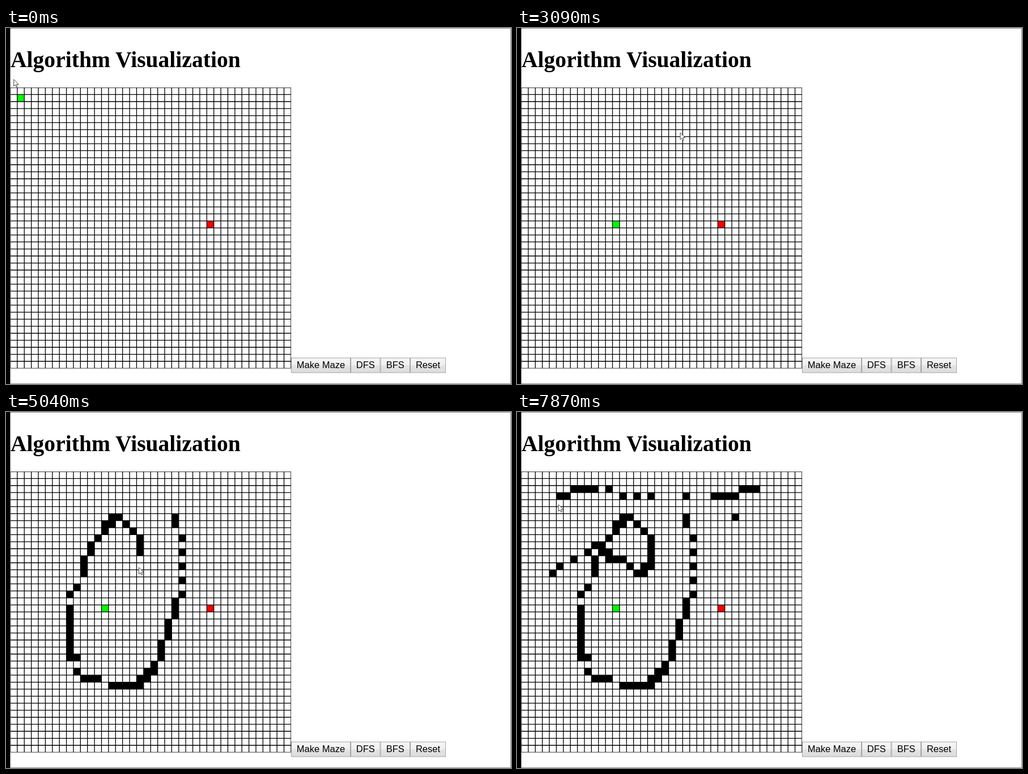
An HTML page that plays this animation: 891 px wide and 628 px high, repeating every 8000 ms.

```html
<!DOCTYPE html>
<html lang="en">
<head>
<meta charset="utf-8">
<title>Algorithm Visualization</title>
<style>
html, body { margin: 0; width: 100%; height: 100%; overflow: hidden; background: #fff; }
svg { display: block; width: 891px; height: 628px; }
.title { font: bold 39.6px "Liberation Serif", serif; }
.label { font: 16.5px "Liberation Sans", sans-serif; text-anchor: middle; }
</style>
</head>
<body>
<svg viewBox="0 0 891 628">
  <defs>
    <linearGradient id="face" x1="0" y1="0" x2="0" y2="1">
      <stop offset="0" stop-color="#f6f6f6"/>
      <stop offset=".49" stop-color="#efefef"/>
      <stop offset=".51" stop-color="#e4e4e4"/>
      <stop offset="1" stop-color="#dcdcdc"/>
    </linearGradient>
    <clipPath id="board"><rect x="7.5" y="105" width="495.5" height="495.5"/></clipPath>
  </defs>
  <rect width="891" height="628" fill="#fff"/>
  <path d="M0 .5H890.5V627.5H0" fill="none" stroke="#8c8c8c"/>
  <rect width="7.5" height="628"/>
  <text class="title" x="8" y="69">Algorithm Visualization</text>
  <g clip-path="url(#board)">
    <path id="walls"/>
    <path id="goal" fill="#f00"/>
    <path id="start" fill="#0f0"/>
    <path id="grid" fill="none" stroke="#000" stroke-width="1.3"/>
  </g>
  <g id="buttons"></g>
  <path id="cursor" d="M0 0V12L2.8 9.5 4.6 13.5 6.5 12.7 4.7 8.8H8.5Z" fill="#fff" stroke="#333" stroke-width=".9"/>
</svg>
<script>
const SIZE = 40, PITCH = 12.385, LEFT = 7.5, TOP = 105;
const LOOP = 8000;
const STEP = 150;  // the picture is refreshed this often
const TICK = 30;   // the board reads the mouse this often
const LEAD = 60;   // the pointer runs ahead of the board
const SYNC = [0, 280, 560, 2040, 3820, 5040, 6820];

const $ = id => document.getElementById(id);
const px = c => LEFT + c * PITCH;
const py = r => TOP + r * PITCH;
const cell = ({ c, r }) =>
  `M${px(Math.round(c))} ${py(Math.round(r))}h${PITCH}v${PITCH}h${-PITCH}z`;

// Mouse gestures: start time, tool, then [ticks, column, row] corners.
// Fast movement leaves gaps between the walls.
const gestures = [
  { at: 90, path: [[0, 0, -1.65], [8, .55, .5], [9, .55, .5], [3, 1.1, .8]] },
  { at: 940, tool: "drag", path: [[0, 1.1, .8], [26, 10, 18.6], [4, 10.8, 18.6],
    [9, 12, 18.9], [3, 12, 18.9], [5, 13.2, 19]] },
  { at: 2560, path: [[0, 13.4, 17.5], [8, 13.4, 17.5], [12, 22.4, 5.6]] },
  { at: 3320, tool: "draw", path: [
    [0, 22.8, 5.8], [2, 24, 9], [4, 23.7, 17], [10, 20.3, 27], [5, 17.9, 29.7],
    [4, 13.5, 29.6], [3, 9.7, 28.6], [2, 8.7, 26.45], [1, 8.2, 26], [7, 7.6, 19],
    [3, 9.6, 14], [3, 10.7, 11], [3, 12.7, 8], [4, 14.8, 5.9], [4, 17.7, 8.9],
    [4, 18, 13], [3, 16.4, 14.4], [1, 15, 12.7], [3, 12.3, 11.7], [4, 10.3, 9.7],
    [4, 3.7, 14]] },
  { at: 6000, path: [[0, 23, 7.8], [10, 30.5, 6]] },
  { at: 6765, tool: "draw", path: [
    [0, 30, 6], [1, 28, 3], [1, 23, 2.7], [8, 23, 2.7], [1, 27, 3], [6, 30, 3],
    [1, 31, 2], [4, 33, 2.4], [3, 18, 3.2], [4, 10, 2], [3, 7, 2.3], [2, 5, 3]] },
  { at: 7860, path: [[0, 4.8, 4.2]] }
];

const corners = gestures.flatMap(g => {
  let t = g.at;
  const list = g.path.map(([n, c, r]) => ({ t: t += n * TICK, c, r }));
  g.end = t;
  return list;
});

function mouse(t) {
  const i = corners.findIndex(p => p.t >= t);
  if (i < 0) return corners[corners.length - 1];
  if (i == 0) return corners[0];
  const a = corners[i - 1], b = corners[i];
  const k = (t - a.t) / (b.t - a.t);
  return { c: a.c + (b.c - a.c) * k, r: a.r + (b.r - a.r) * k };
}

const marks = [];
for (const g of gestures.filter(g => g.tool == "draw"))
  for (let t = g.at; t <= g.end; t += TICK) marks.push({ t, d: cell(mouse(t)) });

const drag = gestures.find(g => g.tool == "drag");

let lines = "";
for (let i = 0; i <= SIZE; i++)
  lines += `M${px(i)} ${TOP}V${py(SIZE)}M${LEFT} ${py(i)}H${px(SIZE)}`;
$("grid").setAttribute("d", lines);
$("goal").setAttribute("d", cell({ c: 28, r: 19 }));

const edges = [503, 608, 660.5, 713, 776];
$("buttons").innerHTML = ["Make Maze", "DFS", "BFS", "Reset"].map((name, i) => {
  const x = edges[i], w = edges[i + 1] - x;
  return `<rect x="${x + .5}" y="582" width="${w - 1}" height="26" fill="url(#face)" stroke="#a4a4a4"/>
    <text class="label" x="${x + w / 2}" y="600">${name}</text>`;
}).join("");

function held(t) {
  const from = SYNC.filter(s => s <= t).pop();
  return from + Math.floor((t - from) / STEP) * STEP;
}

let shown = -1;
function draw(now) {
  const t = held(now % LOOP);
  if (t === shown) return;
  shown = t;
  const tip = mouse(t + LEAD);
  const grip = mouse(Math.min(Math.max(t, drag.at), drag.end));
  $("walls").setAttribute("d", marks.filter(m => m.t <= t).map(m => m.d).join(""));
  $("start").setAttribute("d", cell(grip));
  $("cursor").setAttribute("transform", `translate(${px(tip.c + .5)} ${py(tip.r + .5)})`);
}
function tick() {
  draw(performance.now());
  requestAnimationFrame(tick);
}
draw(0);
requestAnimationFrame(tick);
</script>
</body>
</html>
```
